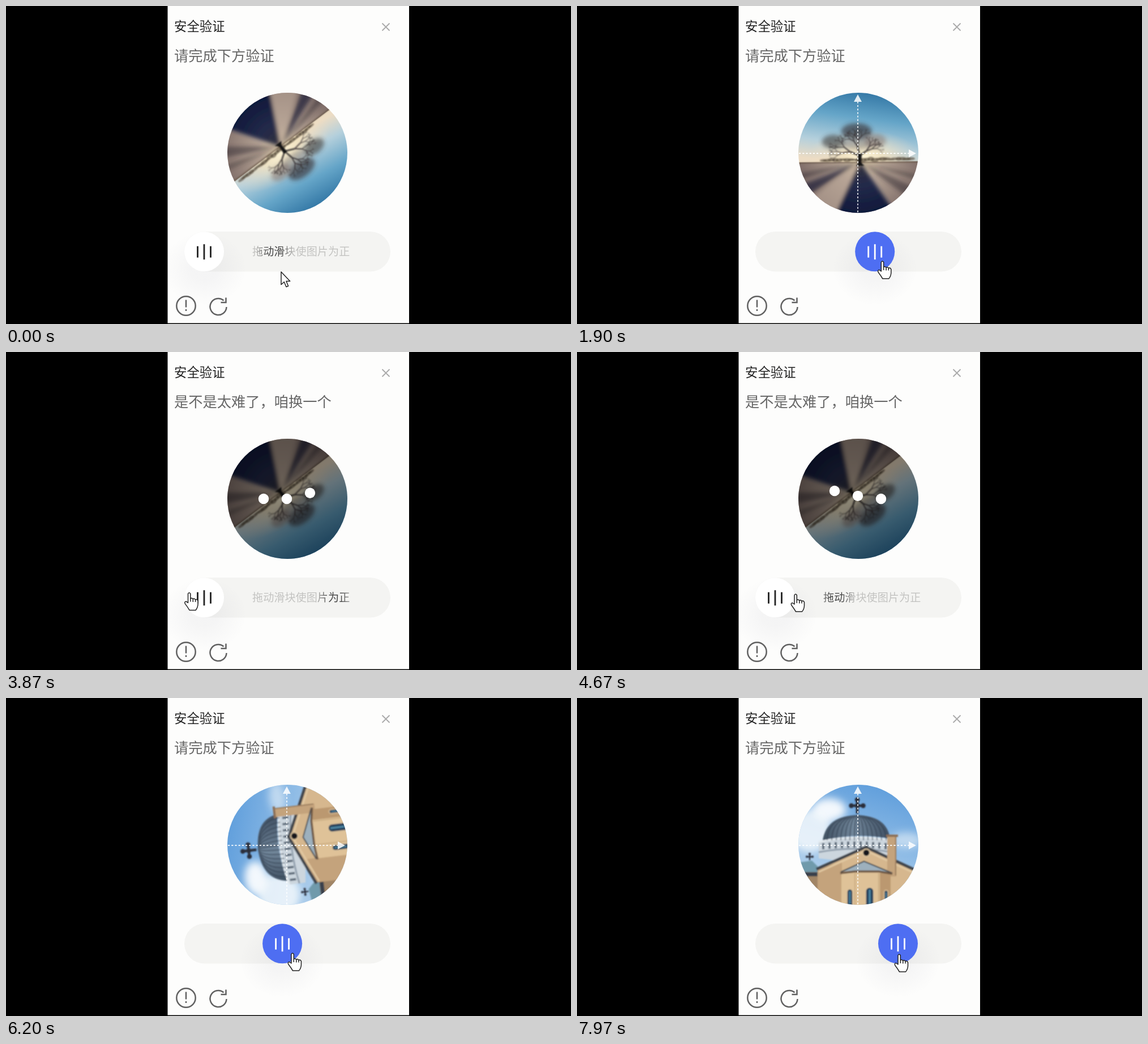
Animation, 998 px wide and 561 px high, one loop 8000 ms. Source, as an HTML page:

```html
<!DOCTYPE html>
<html lang="zh-CN">
<head>
<meta charset="utf-8">
<title>安全验证</title>
<style>
html,body{margin:0;width:100%;height:100%;overflow:hidden;background:#000}
svg{display:block;width:100vw;height:100vh}
text{font-family:"Noto Sans CJK SC","Noto Sans CJK",sans-serif}
</style>
</head>
<body>
<svg viewBox="0 0 998 561">
<defs>
  <clipPath id="disc"><circle cx="497" cy="259" r="106"/></clipPath>
  <filter id="b1" x="-30%" y="-30%" width="160%" height="160%"><feGaussianBlur stdDeviation=".9"/></filter>
  <filter id="b3" x="-30%" y="-30%" width="160%" height="160%"><feGaussianBlur stdDeviation="3.5"/></filter>
  <filter id="b8" x="-50%" y="-50%" width="200%" height="200%"><feGaussianBlur stdDeviation="7"/></filter>
  <linearGradient id="dusk" x1=".7" y1="0" x2=".45" y2="1">
    <stop offset="0" stop-color="#2a6f9f"/><stop offset=".4" stop-color="#65a5c8"/>
    <stop offset=".75" stop-color="#b5d0dc"/><stop offset="1" stop-color="#ecdcc4"/>
  </linearGradient>
  <radialGradient id="sun"><stop offset="0" stop-color="#fff6d8"/><stop offset=".35" stop-color="#fbe6bd" stop-opacity=".7"/><stop offset="1" stop-color="#f3dcc0" stop-opacity="0"/></radialGradient>
  <radialGradient id="snow" gradientUnits="userSpaceOnUse" cx="3" cy="16" r="112">
    <stop offset="0" stop-color="#e9d6b4"/><stop offset=".35" stop-color="#b3a193"/><stop offset="1" stop-color="#7c6a66"/>
  </radialGradient>
  <radialGradient id="navy" gradientUnits="userSpaceOnUse" cx="3" cy="16" r="105">
    <stop offset="0" stop-color="#33313c"/><stop offset=".4" stop-color="#232a49"/><stop offset="1" stop-color="#0a1438"/>
  </radialGradient>
  <linearGradient id="day" x1=".7" y1="0" x2=".4" y2="1">
    <stop offset="0" stop-color="#5c9cdb"/><stop offset=".5" stop-color="#8fbce6"/><stop offset="1" stop-color="#c6dcef"/>
  </linearGradient>
  <linearGradient id="slate"><stop offset="0" stop-color="#3f4f60"/><stop offset=".45" stop-color="#71869a"/><stop offset="1" stop-color="#3f4f62"/></linearGradient>
  <radialGradient id="glow"><stop offset=".3" stop-color="#555570" stop-opacity=".05"/><stop offset="1" stop-color="#555570" stop-opacity="0"/></radialGradient>
  <linearGradient id="shine" gradientUnits="userSpaceOnUse" x1="-34" y1="0" x2="34" y2="0">
    <stop offset="0" stop-color="#c3c3c1"/><stop offset=".35" stop-color="#444"/><stop offset=".65" stop-color="#444"/><stop offset="1" stop-color="#c3c3c1"/>
  </linearGradient>
</defs>

<rect x="285.5" width="426.500" height="559.500" fill="#fdfdfc"/>
<text x="297" y="44" font-size="22.4" fill="#222">安全验证</text>
<path d="M664.5 30.500l13 13m0-13l-13 13" stroke="#aaa" stroke-width="1.8"/>
<text id="sub" x="297" y="96.500" font-size="25.250" font-weight="300" fill="#666"></text>

<g clip-path="url(#disc)">
  <g id="tree"></g>
  <g id="church"></g>
  <g id="cross" fill="#fff" stroke="#fff" opacity=".85">
    <path d="M496 364V168M392 260H588" fill="none" stroke-width="1.800" stroke-dasharray="3.200 3"/>
    <path d="M496 156l7 13h-14zM599 260l-13 7v-14z" stroke="none"/>
  </g>
  <g id="load"><circle cx="497" cy="259" r="107" opacity=".45"/><g id="dots" fill="#fff"></g></g>
</g>

<rect x="315" y="398" width="364" height="70.500" rx="35.200" fill="#f4f4f2"/>
<text id="hint" x="435" y="439.500" font-size="19.150" font-weight="300" fill="url(#shine)">拖动滑块使图片为正</text>
<g id="knob">
  <ellipse cy="30" rx="75" ry="65" fill="url(#glow)"/>
  <circle id="ball" r="35"/>
  <path id="bars" d="M-11.500-9.500v20M0-13v27M11.500-9.500v20" stroke-width="2.800"/>
</g>

<g fill="none" stroke="#606060" stroke-width="2.500">
  <circle cx="318" cy="529" r="16.700"/>
  <path d="M318 518.500v13M318 535v3"/>
  <path d="M389.500 531A14.500 14.500 0 1 1 384.500 519.500M388.500 514.500v8.500h-9"/>
</g>

<g stroke="#222" stroke-width="1.500" stroke-linejoin="round" fill="#fff">
  <path id="arrow" d="M0 0V22.500L5.300 17.800L9 26.500L12.600 25L9 16.500H15.700Z"/>
  <path id="hand" d="M-2 2Q0-1.500 2.300 2V11Q4.500 8.500 6.800 11.500Q9 9.500 11 12.500Q14 11 15.500 14.500V21Q15 27 11.500 31H.5Q-3 25-7 20Q-9 16-5.500 15.500L-2 18ZM2.300 11v5M6.800 11.500v5M11 12.500v4"/>
</g>
</svg>
<script>
const $ = id => document.getElementById(id);
const LOOP = 8000, REST = 350, TURN = 360 / 293;

let seed = 11;
const rnd = () => (seed = seed * 16807 % 2147483647) / 2147483647;
const shape = (d, fill, more = '') => `<path d="${d}" fill="${fill}" ${more}/>`;
const line = (d, color, w, more = '') => shape(d, 'none', `stroke="${color}" stroke-width="${w}" ${more}`);
const oval = (x, y, rx, ry, fill, more = '') => `<ellipse cx="${x}" cy="${y}" rx="${rx}" ry="${ry}" fill="${fill}" ${more}/>`;

// wedge of light or shade on the snow, angles clockwise from up
function ray(a, b, fill, op = 1) {
  const p = d => `${3 + 180 * Math.sin(d * Math.PI / 180)} ${16 - 180 * Math.cos(d * Math.PI / 180)}`;
  return shape(`M3 16L${p(a)}L${p(b)}Z`, fill, `opacity="${op}"`);
}

function branches() {
  const levels = ['', '', '', '', '', ''];
  const grow = (x, y, a, len, n) => {
    if (n > 5) return;
    const r = a * Math.PI / 180;
    const u = x + Math.sin(r) * len, v = y - Math.cos(r) * len * .8;
    levels[n] += `M${x.toFixed(1)} ${y.toFixed(1)}L${u.toFixed(1)} ${v.toFixed(1)}`;
    for (const s of [-1, 1]) grow(u, v, a + s * (14 + 30 * rnd()), len * (.66 + .14 * rnd()), n + 1);
  };
  grow(2, 5, -62, 19, 0);
  grow(2, 4, -10, 19, 0);
  grow(2, 5, 50, 15, 0);
  return levels.map((d, i) => line(d, '#2a2426', [3, 2, 1.4, 1, .7, .6][i], 'opacity=".8"')).join('');
}

function drawTree() {
  const brush = [];
  for (let x = -62; x < 95; x += 7)
    brush.push(oval(x, 13 - rnd() * 2, 5 + rnd() * 3, 1.5 + rnd() * 2.500, '#4b4030', 'opacity=".6"'));
  return '<rect x="-112" y="-112" width="224" height="132" fill="url(#dusk)"/>' +
    oval(8, 6, 100, 46, 'url(#sun)') +
    '<rect x="-112" y="16" width="224" height="100" fill="url(#snow)"/>' +
    '<g filter="url(#b3)">' +
      ray(146, 206, 'url(#navy)') + ray(238, 249, '#20233a', .75) +
      ray(206, 234, '#b9a596', .6) + ray(254, 260, '#38323a', .5) +
      ray(116, 127, '#302b35', .5) + ray(103, 108, '#3c3334', .45) +
    '</g>' +
    `<g filter="url(#b1)">${brush.join('')}` +
      line('M-110 17H110', '#594936', 2, 'opacity=".6"') +
      '<g filter="url(#b3)">' +
        oval(-44, -20, 20, 12, '#383636', 'opacity=".6"') + oval(-3, -38, 27, 14, '#353337', 'opacity=".65"') +
        oval(30, -21, 19, 12, '#74544c', 'opacity=".4"') + oval(0, -16, 28, 10, '#4a4245', 'opacity=".3"') +
      '</g>' + branches() +
      shape('M-1 2L0 17Q-2 21-4 23H10Q6 20 5 16L6 2Z', '#171518') +
    '</g>';
}

const windowAt = (x, y, w) =>
  shape(`M${x - w} 108V${y + w}A${w} ${w} 0 0 1 ${x + w} ${y + w}V108Z`, '#203e58', 'stroke="#e3c89f" stroke-width="1.500"') +
  line(`M${x} ${y + 4}V104`, '#4d86a5', w * .5);

function cross(x, y, s) {
  const k = `M${x} ${y - 12 * s}v${25 * s}M${x - 12 * s} ${y}h${24 * s}`;
  const tips = [[0, -10], [-10, 0], [10, 0], [0, 0]]
    .map(([a, b]) => oval(x + a * s, y + b * s, 4 * s, 4 * s, '#2a2e3a')).join('');
  return line(k, '#2a2e3a', 4.500 * s) + tips;
}

function drawChurch() {
  let ribs = '', posts = '';
  for (let i = 1; i < 15; i++) {
    const x = -63 + i * 8;
    ribs += `M-2-52Q${x}-48 ${x} -8`;
  }
  for (let i = 0; i < 11; i++) posts += `M${-62 + i * 11} ${-3 - Math.sin(i / 3.300) * 3}v11`;
  return '<rect x="-112" y="-112" width="224" height="224" fill="url(#day)"/>' +
    '<g filter="url(#b8)">' +
      oval(-52, -62, 30, 20, '#fff', 'opacity=".9"') + oval(-85, -25, 38, 38, '#f4f8fc', 'opacity=".85"') +
      oval(85, -8, 28, 14, '#eaf2f9', 'opacity=".6"') +
    '</g><g filter="url(#b1)">' +
      shape('M-112 32L-82 28L-68 42V52H-112Z', '#6f9aab') + shape('M-112 48H-66V112H-112Z', '#a18566') +
      line('M-112 52H-66', '#38404b', 7) + cross(-86, 21, .5) +
      shape('M-70 24V-4Q-6-20 58-8V38Z', '#ccd6de') +
      line(posts, '#5c6b79', 4) + line('M-70-5Q-6-20 59-8', '#e4eaee', 3) + line('M-70 13Q-6 1 58 13', '#8f9dab', 3) +
      shape('M-63-8Q-56-52-2-52Q50-52 56-11Q-3-22-63-8Z', 'url(#slate)') +
      line(ribs, '#2f3d4d', 1.800, 'opacity=".6"') + cross(-2, -69, 1.050) +
      shape('M-72 42L13 4L104 46L112 50V112H-72Z', '#d6b78e') +
      shape('M-72 42L-29 30V112H-72Z', '#bd9c74', 'opacity=".7"') +
      line('M-74 43L13 4L112 50', '#41444c', 5) + line('M-70 48L13 10.500L110 55', '#e2c9a2', 3) +
      shape('M51-16H67V56H51Z', '#c4a37b') + line('M49-16H70', '#8b6e57', 4) + line('M66-14V54', '#98795a', 2) +
      oval(14, 14, 6.500, 6.500, '#12161f', 'stroke="#e0c7a1" stroke-width="2"') +
      shape('M-30 50V112H57V50Z', '#dfc298') + shape('M38 50H57V112H38Z', '#bb9870') +
      shape('M-31 47L10 29L60 49L36 46H-6Z', '#9db0bd') +
      line('M-31 48L10 29L60 50', '#3b454f', 2) + line('M-32 50L-6 47H36L60 51', '#6b5442', 3.500) +
      line('M-6 50V112M36 50V112', '#c5a57b', 1.500) +
      windowAt(-15, 78, 5) + windowAt(20, 75, 7) + windowAt(49, 80, 3.500) +
    '</g>';
}

$('tree').innerHTML = drawTree();
$('church').innerHTML = drawChurch();
$('dots').innerHTML = [455, 496, 537].map(x => oval(x, 259, 9.200, 9.200, '#fff')).join('');
const dots = [...$('dots').children];

// eased value through [time, value] pairs
function at(t, keys) {
  let [t0, v0] = keys[0];
  for (const [t1, v1] of keys) {
    if (t < t1) {
      const u = Math.max(0, (t - t0) / (t1 - t0));
      return v0 + (v1 - v0) * u * u * (3 - 2 * u);
    }
    t0 = t1; v0 = v1;
  }
  return v0;
}

const SLIDE = [[0, 0], [900, 0], [2242, 210], [3500, 210], [3750, 0], [5400, 0], [6816, 231], [7600, 217]];
const MOUSE_X = [[0, 486], [150, 486], [800, 352], [2550, 562], [2980, 314], [3700, 314], [4450, 386], [4750, 386], [5250, 352]];
const MOUSE_Y = [[0, 469], [150, 469], [800, 443], [1500, 450], [2550, 450], [2980, 424], [3700, 424], [4450, 427], [4750, 427],
  [5250, 443], [5900, 450], [6400, 450], [7000, 453], [7900, 452]];
const LAG = 67, BOUNCE = 1200;

const show = (id, on) => $(id).style.display = on ? '' : 'none';
const move = (id, x, y, more = '') => $(id).setAttribute('transform', `translate(${x} ${y})${more}`);

function draw(t) {
  const dx = at(t, SLIDE), x = REST + dx;
  const held = t > 850 && t < 2550 || t > 5330;
  const loading = t >= 2550 && t < 5000;
  const second = t >= 5000;

  $('sub').textContent = t >= 3500 && t < 5000 ? '是不是太难了，咱换一个' : '请完成下方验证';

  show('tree', !second);
  show('church', second);
  if (second) move('church', 497, 259, `rotate(${93.4 + dx * TURN})`);
  else move('tree', 497, 259, `rotate(${143 + dx * TURN})`);
  show('cross', held);
  show('load', loading);
  dots.forEach((dot, i) => {
    const p = (t - 4470 - i * 153 + 5 * BOUNCE) % BOUNCE;
    dot.setAttribute('cy', 259 - (p < 400 ? 14 * Math.sin(p / 400 * Math.PI) : 0));
  });

  show('hint', !held && dx === 0);
  const shineX = t < 2500 ? 474 + .17 * t : 457 + .17 * (t - 4670);
  $('shine').setAttribute('gradientTransform', `translate(${400 + (shineX - 400 + 520) % 260} 0)`);

  move('knob', x, 433.3);
  const grey = loading && dx > 0;
  $('ball').setAttribute('fill', held ? '#4e6ef2' : grey ? '#adadad' : '#fff');
  $('bars').setAttribute('stroke', held || grey ? '#fff' : '#222');

  const mx = held ? REST + 2 + at(t + LAG, SLIDE) : at(t, MOUSE_X), my = at(t, MOUSE_Y);
  const over = held || !grey && Math.hypot(mx - x, my - 433) < 38;
  show('hand', over);
  show('arrow', !over);
  move(over ? 'hand' : 'arrow', mx, my);
}

function tick() {
  draw(performance.now() % LOOP);
  requestAnimationFrame(tick);
}
tick();
</script>
</body>
</html>
```
